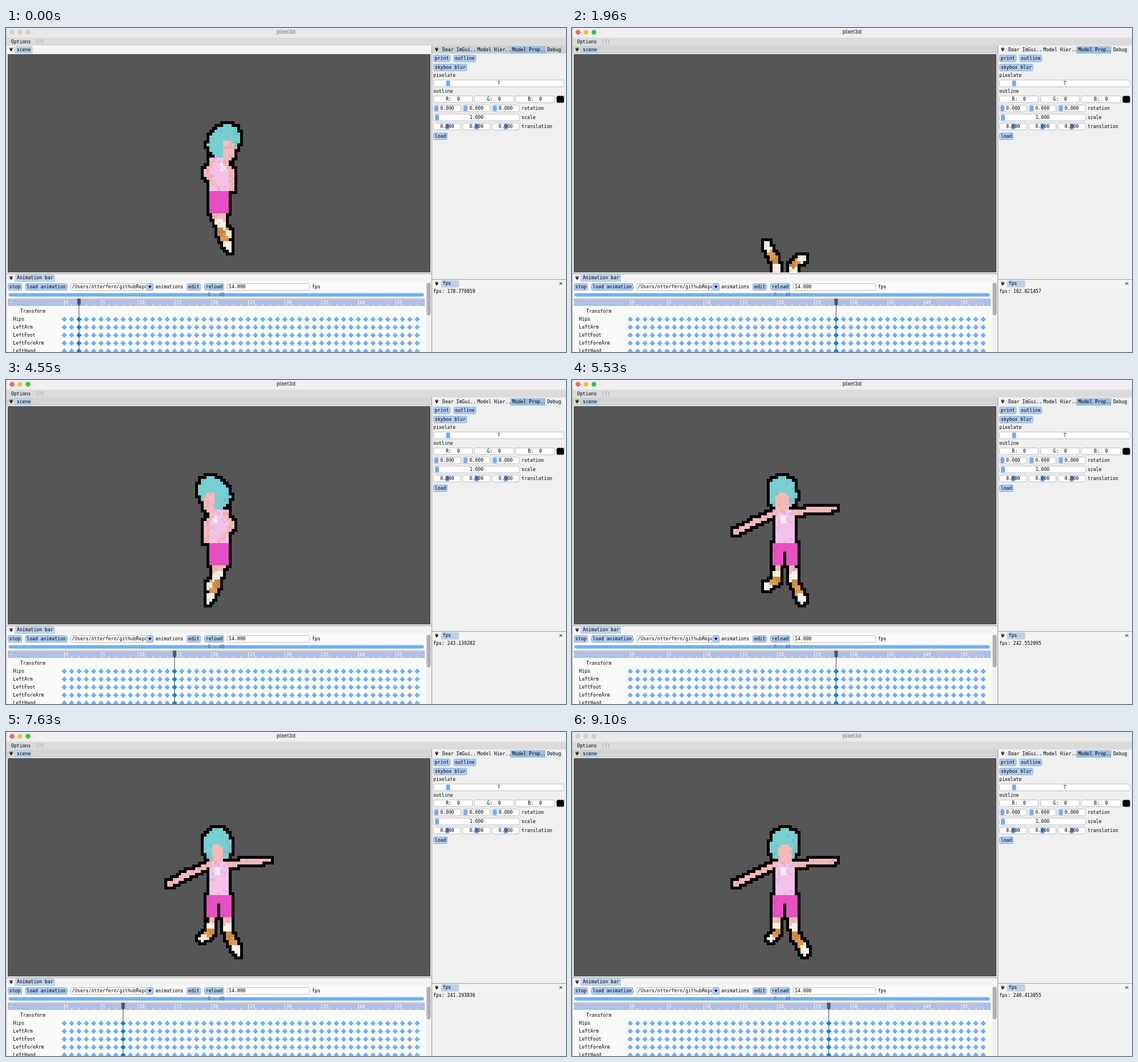
Write an HTML page with a canvas that moves like this. It is 983x570 px and loops after 9170 ms.

```html
<!DOCTYPE html>
<html lang="en">
<head>
<meta charset="utf-8">
<title>pixel3d</title>
<style>
html, body { margin: 0; width: 100%; height: 100%; overflow: hidden; background: #f0f0f0; }
canvas { display: block; width: 983px; height: 570px; }
</style>
</head>
<body>
<canvas id="stage" width="983" height="570"></canvas>
<script>
const ctx = document.getElementById('stage').getContext('2d');
const LOOP = 9170, STEP = 70, CLIP_LENGTH = 48;
const MONO = '8.16px "DejaVu Sans Mono", monospace';
const FRAME = '#ffffff', BUTTON = '#aeccf3', GRAB = '#70adf5', LINE = '#999b9e';
const TAB = '#bdd1e9', TAB_STRONG = '#9dbde5';

// ---------- drawing helpers ----------
function rect(x, y, r, b, fill) {
  ctx.fillStyle = fill;
  ctx.fillRect(x, y, r - x, b - y);
}

function box(x, y, r, b, fill, border = '#a9adb3', radius = 2.5) {
  ctx.beginPath();
  ctx.roundRect(x + .5, y + .5, r - x - 1, b - y - 1, radius);
  ctx.fillStyle = fill;
  ctx.fill();
  if (border) {
    ctx.strokeStyle = border;
    ctx.lineWidth = .8;
    ctx.stroke();
  }
}

function text(s, x, y, fill = '#000', align = 'left', font = MONO) {
  ctx.font = font;
  ctx.textAlign = align;
  ctx.textBaseline = 'middle';
  ctx.fillStyle = fill;
  ctx.fillText(s, x, y);
}

function shape(points, fill) {
  ctx.beginPath();
  points.forEach(([x, y]) => ctx.lineTo(x, y));
  ctx.closePath();
  ctx.fillStyle = fill;
  ctx.fill();
}

function dot(x, y, r, fill) {
  ctx.beginPath();
  ctx.arc(x, y, r, 0, Math.PI * 2);
  ctx.fillStyle = fill;
  ctx.fill();
}

// Lays labels out left to right; each button fits its text.
function button(label, x, y) {
  const r = x + label.length * 4.915 + 5.5;
  box(x, y, r, y + 13, BUTTON, '#8fa3bd');
  text(label, (x + r) / 2, y + 6.8, '#000', 'center');
}

function field(label, x, r, y, grab) {
  box(x, y, r, y + 13, FRAME);
  if (grab) box(grab, y + 1, grab + 8, y + 12, GRAB, null, 2);
  text(label, (x + r) / 2, y + 6.8, '#000', 'center');
}

const arrowDown = (x, y) => shape([[x - 3, y - 2], [x + 3, y - 2], [x, y + 2.5]], '#000');

function dockMenu(x, y) {
  rect(x - 3, y - 3, x + 3, y - 2, '#000');
  arrowDown(x, y + .8);
}

function tab(label, x, y, fill) {
  ctx.beginPath();
  ctx.roundRect(x, y, label.length * 4.915 + 6.5, 13, [2.5, 2.5, 0, 0]);
  ctx.fillStyle = fill;
  ctx.fill();
  text(label, x + 3.5, y + 6.7);
}

// ---------- timing ----------
// Piecewise-linear value at t, held before the first and after the last key.
function along(times, values, t) {
  if (t <= times[0]) return values[0];
  const i = times.findIndex(key => key >= t);
  if (i < 0) return values[values.length - 1];
  const u = (t - times[i - 1]) / (times[i] - times[i - 1]);
  return values[i - 1] + (values[i] - values[i - 1]) * u;
}

const KEY_STEPS = [0, 28, 46, 65, 130];
const PLAYHEAD = [2.2, 28.3, 44.7, 63.1, 123.7];
const RATE = [178.770859, 182.821457, 236.884338, 243.139282, 240.413055];

// ---------- motion ----------
// First pass: turn to the viewer, tip over into a handstand, then swing up head first.
function flip(f) {
  const pitch = along([28, 44], [0, 1.32], f);
  return {
    yaw: along([2, 8], [Math.PI / 2, 0], f),
    roll: along([12, 28, 44], [0, Math.PI, 5.43], f),
    pitch,
    zoom: 1 + .23 * pitch,
    x: along([28, 44], [373.8, 368], f),
    y: along([12, 28, 44], [231, 537, 373], f)
  };
}

// Later passes: upright, spinning about the vertical axis.
function spin(f) {
  const turns = along([0, 8, 15, 27.5, 50], [.33, 0, -.25, -1, -1.75], f);
  return { yaw: turns * Math.PI * 2, roll: 0, pitch: 0, zoom: 1, x: 373.8, y: 231 };
}

// Model space: origin between the shoulders, x to the side, y down, z forward.
function projector(m) {
  const cosYaw = Math.cos(m.yaw), sinYaw = Math.sin(m.yaw);
  const cosRoll = Math.cos(m.roll), sinRoll = Math.sin(m.roll);
  return ([x, y, z = 0]) => {
    const k = m.zoom * 130 / (130 + y * Math.sin(m.pitch));
    const px = (x * cosYaw + z * sinYaw) * k, py = y * Math.cos(m.pitch) * k;
    return [m.x + px * cosRoll - py * sinRoll, m.y + px * sinRoll + py * cosRoll, k];
  };
}

// ---------- figure ----------
const SKIN = '#f5b9b9', HAIR = '#76cfd1', SHIRT = '#f3c2e8', SHORTS = '#e84fc2',
  SHOE = '#e09a4a', PALE = '#f8efe6', PRINT = '#f9e4f5';
const shin = t => t < .45 ? SKIN : PALE;
const shoe = t => t < .2 ? '#c98b40' : t < .62 ? SHOE : PALE;

// Thick stroke between two projected points; "flat" cuts its ends square.
// tint is a colour or maps the place along the stroke to one.
function stroke([ax, ay, ak], [bx, by, bk], r, tint, flat) {
  const dx = bx - ax, dy = by - ay, len = dx * dx + dy * dy || 1;
  return (x, y) => {
    const raw = ((x - ax) * dx + (y - ay) * dy) / len;
    if (flat && (raw < 0 || raw > 1)) return null;
    const t = Math.min(1, Math.max(0, raw));
    const d = Math.hypot(x - ax - dx * t, y - ay - dy * t);
    return d < r * (ak + (bk - ak) * t) ? (tint.call ? tint(t) : tint) : null;
  };
}

// Parts from back to front.
function buildFigure(motion) {
  const project = projector(motion), parts = [];
  const add = (a, b, r, tint, flat) => parts.push(stroke(project(a), project(b), r, tint, flat));
  const facing = Math.cos(motion.yaw), spread = Math.abs(facing);
  const sides = [-1, 1];

  for (const s of sides) {
    const knee = [s * 12.5, 92, s * 7];
    const ankle = [s * 15.5 + 1.5, 123 + s * 3, 4];
    const toe = [s * 31 + 2, 144 + s * 12, 18];
    add(knee, ankle, 6.5, shin, true);
    add(ankle, toe, 6.3, shoe);
  }
  for (const s of sides) add([s * 12.5, 54, s * 7], [s * 12.5, 93, s * 7], 10, SHORTS, true);
  add([-12.5, 55, -7], [12.5, 55, 7], 15, SHORTS, true);
  add([-1.5, -4], [-1.5, 55], 17.5, SHIRT, true);
  if (facing > -.3) add([-2, 10, 9], [-2, 18, 9], 5, PRINT);

  for (const s of sides) {
    const shoulder = [s * 16, 2, s * 10];
    const handY = 51 - 36 * spread - 21 * s * spread * spread;
    const elbow = [s * 52, handY / 2, s * 24 * (1 - spread)];
    const hand = [s * 87, handY, (11 + 11 * s) * (1 - spread)];
    add(shoulder, elbow, 4.6, SKIN);
    add(elbow, hand, 4.6, SKIN);
  }

  add([-3, -37.5, 14], [-3, -26, 4], 23.7, HAIR);
  if (facing > -.3 && motion.pitch < .5) add([-3, -22, 17], [-3, -10, 17], 11, SKIN);
  return parts.reverse();
}

const CELL = 4.915, GX = 189.5, GY = 164, COLS = 76, ROWS = 56;
const noise = (i, j) => {
  const n = Math.sin(i * 127.1 + j * 311.7) * 43758.5453;
  return n - Math.floor(n);
};

// Samples the figure on a coarse grid and rings it with one dark cell.
function drawFigure(motion) {
  const parts = buildFigure(motion), cells = [];
  for (let j = 0; j < ROWS; j++) {
    for (let i = 0; i < COLS; i++) {
      const x = GX + (i + .5) * CELL, y = GY + (j + .5) * CELL;
      let tint = null;
      for (const part of parts) if ((tint = part(x, y))) break;
      cells.push(tint);
    }
  }
  const at = (i, j) => i >= 0 && j >= 0 && i < COLS && j < ROWS ? cells[j * COLS + i] : null;
  const nearFill = (i, j) => {
    for (let n = 0; n < 9; n++) if (at(i + n % 3 - 1, j + Math.floor(n / 3) - 1)) return true;
    return false;
  };
  ctx.save();
  ctx.beginPath();
  ctx.rect(3, 46, 742, 384);
  ctx.clip();
  for (let j = 0; j < ROWS; j++) {
    for (let i = 0; i < COLS; i++) {
      const tint = at(i, j);
      if (!tint && !nearFill(i, j)) continue;
      const x = Math.round(GX + i * CELL), r = Math.round(GX + (i + 1) * CELL);
      const y = Math.round(GY + j * CELL), b = Math.round(GY + (j + 1) * CELL);
      rect(x, y, r, b, tint || '#000');
      if (tint && noise(i, j) > .85) rect(x, y, r, b, 'rgba(90,60,80,.08)');
    }
  }
  ctx.restore();
}

// ---------- interface ----------
function drawWindow(active) {
  rect(0, 0, 983, 570, '#f0f0f0');
  rect(0, 0, 983, 17, active ? '#f0eef0' : '#e8e8e8');
  ['#ff5f57', '#febc2e', '#28c840'].forEach((c, i) => dot(10.5 + 14 * i, 7.5, 4.2, active ? c : '#d0d0d0'));
  text('pixel3d', 491.5, 7.5, active ? '#484848' : '#8f8f8f', 'center', '600 9.3px Inter, sans-serif');
  rect(0, 17, 983, 31, '#dbdbdb');
  text('Options', 9, 25);
  text('(?)', 52, 25, '#999');
}

const barColour = focused => focused ? '#d3d4d6' : '#f4f4f5';

function drawScene(focused) {
  rect(0, 31, 747, 45, barColour(focused));
  dockMenu(9, 38);
  tab('scene', 15.5, 32, TAB);
  rect(3, 46, 745, 430, '#565656');
}

function drawProperties(focused) {
  rect(748, 31, 983, 45, barColour(focused));
  dockMenu(756, 38);
  ['Dear ImGui..', 'Model Hier..', 'Model Prop..', 'Debug'].forEach((label, i) =>
    tab(label, 762.5 + 61.3 * i, 32, i === 2 ? TAB_STRONG : focused ? '#c5cdd7' : '#ebedef'));
  button('print', 750, 47);
  button('outline', 785.5, 47);
  button('skybox blur', 750, 63);
  text('pixelate', 750, 84);
  field('7', 750, 980, 91, 772);
  text('outline', 750, 112);
  ['R', 'G', 'B'].forEach((c, i) => field(c + ':  0', 750 + 71.7 * i, 819 + 72.3 * i, 119));
  box(966, 119, 980, 132, '#000', '#777');
  for (let i = 0; i < 3; i++) {
    const x = 750 + 51.3 * i;
    field('0.000', x, x + 49, 135, x + 1.5);
    field('0.000', x, x + 49, 167, x + 20.5);
  }
  field('1.000', 750, 902, 151, 752.5);
  ['rotation', 'scale', 'translation'].forEach((label, i) => text(label, 905, 142 + 16 * i));
  button('load', 750, 184);
}

function drawRate(rate) {
  rect(748, 442, 983, 443, LINE);
  rect(748, 443, 983, 457, barColour(false));
  dockMenu(756, 450);
  box(763, 443.5, 796, 457, TAB, null);
  text('fps', 766.5, 450.2);
  ctx.strokeStyle = '#000';
  ctx.lineWidth = 1;
  ctx.beginPath();
  for (const s of [-1, 1]) {
    ctx.moveTo(974 - 2.5 * s, 447);
    ctx.lineTo(974 + 2.5 * s, 452);
  }
  ctx.stroke();
  text('fps: ' + rate.toFixed(6), 750, 463.5);
}

const frameX = f => 102.3 + f * 12.905;

function drawControls() {
  rect(0, 432, 747, 433, LINE);
  rect(0, 433, 747, 447, barColour(false));
  rect(1, 447, 747, 570, '#fafafa');
  dockMenu(9, 440);
  tab('Animation bar', 15.5, 433.5, TAB);
  button('stop', 3, 449);
  button('load animation', 33.5, 449);
  box(113, 449, 259, 462, FRAME);
  ctx.save();
  ctx.beginPath();
  ctx.rect(114, 449, 132, 13);
  ctx.clip();
  text('/Users/otterfern/githubRepo', 115.5, 455.8);
  ctx.restore();
  box(246.5, 449, 259, 462, BUTTON, '#8fa3bd');
  arrowDown(252.7, 455.5);
  text('animations', 262, 455.8);
  button('edit', 317, 449);
  button('reload', 348, 449);
  box(388, 449, 534, 462, FRAME);
  text('14.000', 391, 455.8);
  text('fps', 537, 455.8);
}

function drawTimeline(frame) {
  box(4, 466, 734, 473, '#72aff6', null, 3);
  text('0 - 48', 369, 469.8, '#56708f', 'center');
  rect(3, 476, 735, 489, '#b3bee2');
  for (let f = 0; f <= CLIP_LENGTH; f++) {
    const major = f % 5 === 0, x = Math.round(frameX(f));
    rect(x, major ? 478 : 486, x + 1, 489, '#f3f5fb');
    if (major) text(String(f), x + 2.5, 483.5, '#fff');
  }

  text('Transform', 25, 498.8);
  const px = frameX(frame);
  rect(px - .6, 488, px + .6, 570, '#62666c');
  ['Hips', 'LeftArm', 'LeftFoot', 'LeftForeArm', 'LeftHand'].forEach((name, row) => {
    const y = 512.5 + 14 * row;
    text(name, 12.5, y + .3);
    for (let f = 0; f <= CLIP_LENGTH; f++) {
      const x = frameX(f), r = 4.7;
      shape([[x - r, y], [x, y - r], [x + r, y], [x, y + r]], f === frame ? '#127fe0' : '#6db0f8');
    }
  });
  shape([[px - 3, 476], [px + 3, 476], [px + 3, 486], [px, 489], [px - 3, 486]], '#50565f');

  rect(737, 447, 747, 570, '#f1f1f1');
  box(738, 448, 746, 506, '#b0b0b0', null, 3);
}

function draw(step) {
  const total = Math.floor(along(KEY_STEPS, PLAYHEAD, step));
  const frame = total % CLIP_LENGTH;
  const sceneFocused = step >= 15;
  drawWindow(step >= 10 && step < 128);
  drawScene(sceneFocused);
  drawFigure(total < CLIP_LENGTH ? flip(frame) : spin(frame));
  drawProperties(!sceneFocused);
  drawControls();
  drawTimeline(frame);
  drawRate(along(KEY_STEPS, RATE, step));
  rect(747, 31, 748, 570, LINE);
  rect(0, 0, 1, 570, '#b5b5b5');
}

const start = performance.now();
let shown = -1;
function tick() {
  const step = Math.floor((performance.now() - start) % LOOP / STEP);
  if (step !== shown) draw(shown = step);
  requestAnimationFrame(tick);
}
tick();
</script>
</body>
</html>
```
